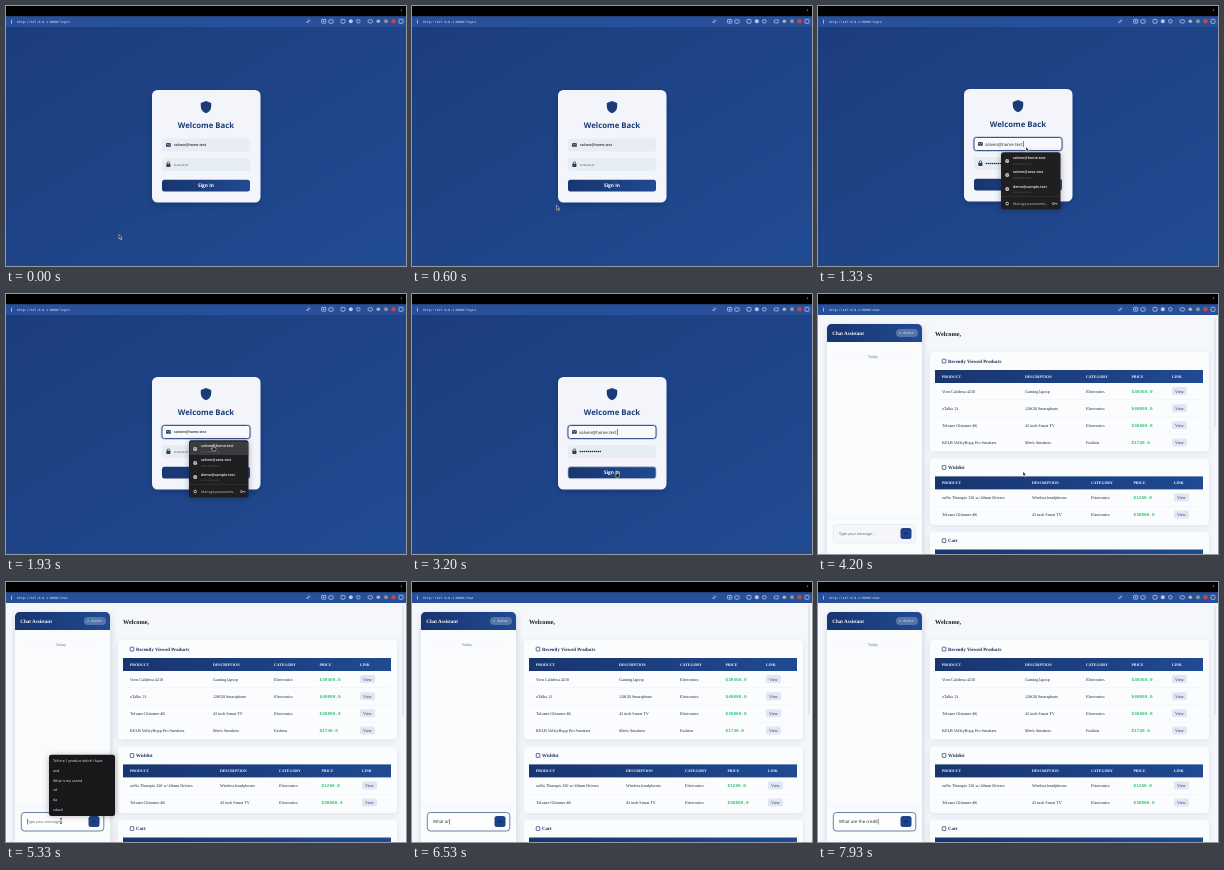
Recreate the animation shown at these times as an HTML page. Size 400 by 260 pixels, loop 8 s.

```html
<!DOCTYPE html>
<html lang="en">
<head>
<meta charset="utf-8">
<title>Sign in and chat</title>
<style>
html, body { margin: 0; width: 100%; height: 100%; overflow: hidden; background: #000; }
svg { display: block; width: 100vw; height: 100vh; }
text { white-space: pre; text-rendering: geometricPrecision; }
.sans { font-family: "Open Sans", "Noto Sans", sans-serif; }
.serif { font-family: "Liberation Serif", "Noto Serif", serif; }
.mono { font-family: "Liberation Mono", "DejaVu Sans Mono", monospace; }
</style>
</head>
<body>
<svg id="stage" viewBox="0 0 400 260">
  <defs>
    <linearGradient id="page" x1="0" y1="0" x2="1" y2="1">
      <stop offset="0" stop-color="#1c3d7c"/><stop offset="1" stop-color="#214b93"/>
    </linearGradient>
    <linearGradient id="navy">
      <stop offset="0" stop-color="#18356f"/><stop offset="1" stop-color="#204a92"/>
    </linearGradient>
    <filter id="soft" x="-20%" y="-20%" width="140%" height="140%">
      <feGaussianBlur stdDeviation="3"/>
    </filter>
  </defs>
</svg>
<script>
const LOOP = 8000;
const NAVY = '#1c3c78', INK = '#1d2230', GREY = '#6b7280';
const stage = document.getElementById('stage');

function add(parent, tag, attrs, content) {
  const node = document.createElementNS('http://www.w3.org/2000/svg', tag);
  for (const key in attrs) node.setAttribute(key, attrs[key]);
  if (content !== undefined) node.textContent = content;
  return parent.appendChild(node);
}
const group = parent => add(parent, 'g', {});
const box = (parent, x, y, width, height, fill, rx = 0, more = {}) =>
  add(parent, 'rect', { x, y, width, height, fill, rx, ...more });
const label = (parent, x, y, content, size, fill, face = 'sans', weight = 400, anchor = 'start') =>
  add(parent, 'text', { x, y, class: face, 'font-size': size, 'font-weight': weight, fill, 'text-anchor': anchor }, content);
const shape = (parent, d, fill, more = {}) => add(parent, 'path', { d, fill, ...more });
const disc = (parent, cx, cy, r, fill, more = {}) => add(parent, 'circle', { cx, cy, r, fill, ...more });
const show = (node, on) => node.setAttribute('display', on ? 'inline' : 'none');

function dots(parent, x, y, count, step, r, fill) {
  const g = group(parent);
  for (let i = 0; i < count; i++) disc(g, x + r + i * step, y, r, fill);
  return g;
}

// Login page
const login = group(stage);
box(login, 0, 20, 400, 240, 'url(#page)');
const card = group(login);
box(card, 147, 87, 106, 110, '#0b1f4a', 6, { opacity: .45, filter: 'url(#soft)' });
box(card, 146, 83, 108.5, 112.5, '#f3f5fa', 5.5);
shape(card, 'M200 94 L205.2 96 V99.5 C205.2 103 203 105 200 106.3 C197 105 194.8 103 194.8 99.5 V96 Z', NAVY);
label(card, 200, 121.2, 'Welcome Back', 7.8, NAVY, 'sans', 700, 'middle');
const mailBox = box(card, 156, 131.5, 88, 13, '#e7edf4', 2.5);
box(card, 156, 151, 88, 13, '#e7edf4', 2.5);
const mailRing = group(card);
box(mailRing, 155.3, 130.8, 89.4, 14.4, 'none', 3, { stroke: '#b9c6de', 'stroke-width': 1 });
box(mailRing, 156, 131.5, 88, 13, '#f7f9fc', 2.5, { stroke: '#24478a', 'stroke-width': .9 });
box(card, 160, 136.1, 4.8, 3.6, '#333f55', .5);
shape(card, 'M160.2 136.5 L162.4 138.2 L164.6 136.5', 'none', { stroke: '#eef2f7', 'stroke-width': .5 });
box(card, 160.4, 156.8, 4, 3.2, '#333f55', .5);
shape(card, 'M161.2 157 V156 A1.2 1.3 0 0 1 163.6 156 V157', 'none', { stroke: '#333f55', 'stroke-width': .7 });
const MAIL = 'solven@home.test';
const smallFields = group(card), fullFields = group(card);
label(smallFields, 168, 139.4, MAIL, 3.6, INK, 'sans', 600);
dots(smallFields, 168, 158, 11, 1.32, .48, INK);
label(fullFields, 167, 139.5, MAIL, 4.35, INK);
dots(fullFields, 167.5, 157.5, 11, 2, .78, INK);
const mailCaret = box(card, 205.2, 135, .5, 6, '#111');
box(card, 156, 172.8, 88, 11.8, 'url(#navy)', 2.5);
const buttonGlow = box(card, 156, 172.8, 88, 11.8, 'none', 2.5, { stroke: '#aebbd5', 'stroke-width': .7 });
label(card, 200, 180.4, 'Sign In', 4.8, '#fff', 'sans', 700, 'middle');

// Saved password list
const accounts = group(login);
box(accounts, 183, 147, 59.5, 57, '#101010', 2.5, { opacity: .3, filter: 'url(#soft)' });
box(accounts, 183, 146.2, 59.5, 57.3, '#1f1f21', 2.5);
const hoverRow = box(accounts, 183.5, 147.5, 58.5, 13.5, '#3b3c3f', 1);
[MAIL, 'solven@area.test', 'demo@sample.test'].forEach((name, i) => {
  const y = 153.3 + i * 14.1;
  disc(accounts, 189.2, y + 1.6, 2, '#d8d8da');
  shape(accounts, `M187.8 ${y + 1} l1.6 .4 l-.4 1.6 M189.6 ${y + .2} l1 1.4`, 'none', { stroke: '#333', 'stroke-width': .5 });
  label(accounts, 195, y, name, 3.65, '#f2f2f2', 'sans', 600);
  dots(accounts, 195.2, y + 4.6, 11, 1.7, .42, '#97979b');
});
box(accounts, 183, 190.5, 59.5, .4, '#454548');
disc(accounts, 189.2, 197.6, 1.3, 'none', { stroke: '#d8d8da', 'stroke-width': .9 });
label(accounts, 195, 198.9, 'Manage passwords…', 3.6, '#c6c6c8');
disc(accounts, 235.4, 197.6, 1, 'none', { stroke: '#e4e4e4', 'stroke-width': .6 });
shape(accounts, 'M236.4 197.6 H239 V198.7', 'none', { stroke: '#e4e4e4', 'stroke-width': .6 });

// Shop page
const shop = group(stage);
box(shop, 0, 20, 400, 240, '#f5f7fb');
box(shop, 9, 32, 96, 240, '#8593ad', 5, { opacity: .35, filter: 'url(#soft)' });
box(shop, 9, 30, 95, 240, '#fafbfd', 4.5);
shape(shop, 'M9 48 V34.5 A4.5 4.5 0 0 1 13.5 30 H99.5 A4.5 4.5 0 0 1 104 34.5 V48 Z', 'url(#navy)');
label(shop, 14.3, 40.6, 'Chat Assistant', 5.1, '#fff', 'serif', 700);
box(shop, 78, 35, 22, 8, '#5875ab', 4);
disc(shop, 82, 39, .9, '#45d483');
label(shop, 85, 40.3, 'Active', 3.9, '#eef2fa', 'serif');
box(shop, 20, 62.8, 26, .3, '#e0e4ec');
box(shop, 64, 62.8, 26, .3, '#e0e4ec');
label(shop, 55, 64.2, 'Today', 4.2, GREY, 'serif', 400, 'middle');
box(shop, 9, 224.5, 95, .4, '#e6e9f0');
const chatBox = box(shop, 15.3, 230.5, 82.5, 18.5, '#f4f6fa', 3.2, { 'stroke-width': .7 });
box(shop, 82.5, 234, 11, 11, '#1f4386', 2.5);
shape(shop, 'M86.3 237.7 L90 239.5 L86.3 241.3 L87 239.5 Z', '#122c60');
const hint = label(shop, 21, 241.2, 'Type your message...', 3.7, '#596273');
const typed = label(shop, 21, 241.2, '', 4.35, INK);
const chatCaret = box(shop, 21, 236.8, .45, 5.8, '#111');

label(shop, 117, 42.2, 'Welcome,', 6.3, '#161b28', 'serif', 700);

function section(y, height, title, columns, rows) {
  box(shop, 112, y + 1.5, 279, height, '#8593ad', 4, { opacity: .22, filter: 'url(#soft)' });
  box(shop, 112, y, 279, height, '#fbfcfe', 4);
  box(shop, 124.2, y + 7.2, 3.6, 3.8, 'none', .3, { stroke: NAVY, 'stroke-width': .7 });
  label(shop, 130, y + 10.7, title, 4.8, '#1a2a50', 'serif', 700);
  box(shop, 117, y + 18, 268, 13, 'url(#navy)');
  ['PRODUCT', 'DESCRIPTION', 'CATEGORY', 'PRICE', 'LINK'].forEach((name, i) =>
    label(shop, columns[i], y + 25.8, name, 3.85, '#f4f7ff', 'serif', 700));
  rows.forEach((row, i) => {
    const mid = y + 39.3 + i * 17.1;
    row.forEach((cell, c) => c === 3
      ? label(shop, columns[c], mid + 1.3, cell, 4.4, '#2fc476', 'mono', 700)
      : label(shop, columns[c], mid + 1.3, cell, 4.15, INK, 'serif'));
    box(shop, columns[4], mid - 4.2, 15, 8, '#e1e6f0', 1.8);
    label(shop, columns[4] + 7.5, mid + 1.3, 'View', 4.2, NAVY, 'serif', 400, 'middle');
    box(shop, 117, mid + 8.4, 268, .3, '#e3e7ee');
  });
}
const TV = ['Tolvane Glimmer 4K', '43 inch Smart TV', 'Electronics', '$30000.0'];
section(58, 99.5, 'Recently Viewed Products', [124, 207, 268, 313.5, 354], [
  ['Vorn Calidexa 4210', 'Gaming laptop', 'Electronics', '$39450.0'],
  ['oTalko 21', '128GB Smartphone', 'Electronics', '$49099.0'],
  TV,
  ['KELB VolleyHopp Pro Sneakers', "Men's Sneakers", 'Fashion', '$1740.0']
]);
section(164.4, 66.5, 'Wishlist', [124, 214, 273, 315.5, 356], [
  ['zuNo Thumpix 320 w/ 40mm Drivers', 'Wireless headphones', 'Electronics', '$1250.0'],
  TV
]);
section(237.5, 60, 'Cart', [124, 207, 268, 314, 354], []);
box(shop, 396.2, 23, 1.6, 110, '#dde2ea', .8);

// Earlier messages list
const history = group(shop);
box(history, 43, 174, 66, 60, '#000', 2.5, { opacity: .3, filter: 'url(#soft)' });
box(history, 43, 172.7, 66, 61.3, '#18181a', 2.5);
['Tell me 1 product which I have', 'and', 'What is my userid', 'sd', 'da', 'sdasd'].forEach((line, i) =>
  label(history, 47, 180.2 + i * 9.75, line, 3.53, '#f0f0f0'));

// Browser bar
box(stage, 0, 0, 400, 10.3, '#000');
box(stage, 0, 10.2, 400, 10.8, '#28509a');
disc(stage, 395.5, 4.3, .7, '#d87a3a');
disc(stage, 5.5, 14, .5, '#dbe5f7');
box(stage, 5.1, 15, .8, 2.4, '#dbe5f7');
const address = label(stage, 11, 16.8, '', 3.25, '#eaf0fc', 'mono');
const line = { stroke: '#c9d6ee', 'stroke-width': .7 };
shape(stage, 'M300.6 17 L303.8 13.8 M300.8 15.4 L302.4 17 M302 13.6 L303.8 15.4', 'none', line);
box(stage, 315.6, 13.4, 4.2, 3.8, 'none', .6, line);
disc(stage, 317.7, 15.3, .8, '#c9d6ee');
box(stage, 322.8, 13.8, 4.4, 3.4, 'none', .9, line);
box(stage, 335, 13.4, 4, 3.8, 'none', 1, line);
disc(stage, 344.8, 15.3, 2, '#b8c8e6');
disc(stage, 352.3, 15.3, 1.8, 'none', line);
box(stage, 362, 13.8, 4.6, 3.2, 'none', 1.5, line);
disc(stage, 372.3, 15.3, 1.8, '#a9b7b2');
disc(stage, 380, 15.3, 2, '#8f9098');
disc(stage, 387.5, 15.3, 2.2, '#c4483f');
box(stage, 393, 13.3, 4, 4, 'none', .6, line);

// Pointers, all with the hot spot at 0,0
const pointer = group(stage);
const outline = { stroke: '#fff', 'stroke-width': .5, 'stroke-linejoin': 'round' };
const arrow = shape(pointer, 'M0 -1.5 V3 L1 2.1 L1.8 3.8 L2.6 3.4 L1.8 1.8 H3.1 Z', '#111', outline);
const hand = shape(pointer, 'M-.6 -1.5 H.4 V.6 L2.4 1.1 V3 L1.7 4.3 H-.9 L-2.2 2 L-1.6 1.4 L-.6 2.2 Z', '#111', outline);
const beam = shape(pointer, 'M-1 -2 H1 M0 -2 V3 M-1 3 H1', 'none', { stroke: '#222', 'stroke-width': .6 });

// time, x, y
const PATH = [
  [0, 113, 230], [350, 113, 230], [1000, 208, 142], [1550, 208, 142.5], [1850, 207.5, 152.5],
  [2400, 207, 153.5], [2950, 205, 179], [4750, 205, 179], [5180, 55, 238.5], [LOOP, 55, 238.5]
];
const ease = p => p * p * (3 - 2 * p);

function pointAt(t) {
  const i = PATH.findIndex(step => step[0] > t);
  const [t0, x0, y0] = PATH[i - 1], [t1, x1, y1] = PATH[i];
  const p = ease((t - t0) / (t1 - t0));
  return [x0 + (x1 - x0) * p, y0 + (y1 - y0) * p];
}

const MESSAGE = 'What are the credit';
const T = { lift: 650, focus: 1130, pick: 2400, load: 3600, chat: 5230, type: 5730, key: 115 };

function draw(t) {
  const [x, y] = pointAt(t);
  const onLogin = t < T.load, focused = t >= T.focus;
  show(login, onLogin);
  show(shop, !onLogin);
  address.textContent = 'http://127.0.0.1:8000/' + (onLogin ? 'login' : 'chat');

  const lift = ease(Math.min(1, Math.max(0, (t - T.lift) / 250)));
  card.setAttribute('transform', `translate(0 ${1 - lift})`);
  const listOpen = focused && t < T.pick;
  const preview = listOpen && y > 147;
  show(accounts, listOpen);
  show(hoverRow, preview);
  show(mailRing, focused);
  show(mailBox, !focused);
  show(smallFields, !focused || preview);
  show(fullFields, focused && !preview);
  show(mailCaret, focused && !preview);
  show(buttonGlow, y > 172 && t > T.pick);

  const count = t < T.type ? 0 : Math.min(MESSAGE.length, 1 + Math.floor((t - T.type) / T.key));
  const chatting = t >= T.chat;
  show(history, chatting && !count);
  show(hint, !count);
  typed.textContent = MESSAGE.slice(0, count);
  show(chatCaret, chatting);
  if (!onLogin) chatCaret.setAttribute('x', 21.2 + (count ? typed.getComputedTextLength() : 0));
  chatBox.setAttribute('stroke', chatting ? '#2b4a87' : '#e3e7ef');
  chatBox.setAttribute('fill', chatting ? '#fdfdfe' : '#f4f6fa');

  pointer.setAttribute('transform', `translate(${x} ${y})`);
  show(pointer, !count);
  const overLink = preview || (onLogin && t > T.pick && y > 172);
  const overText = t > 5100;
  show(hand, overLink);
  show(beam, overText);
  show(arrow, !overLink && !overText);
}

const start = performance.now();
function tick() {
  draw((performance.now() - start) % LOOP);
  requestAnimationFrame(tick);
}
tick();
</script>
</body>
</html>
```
